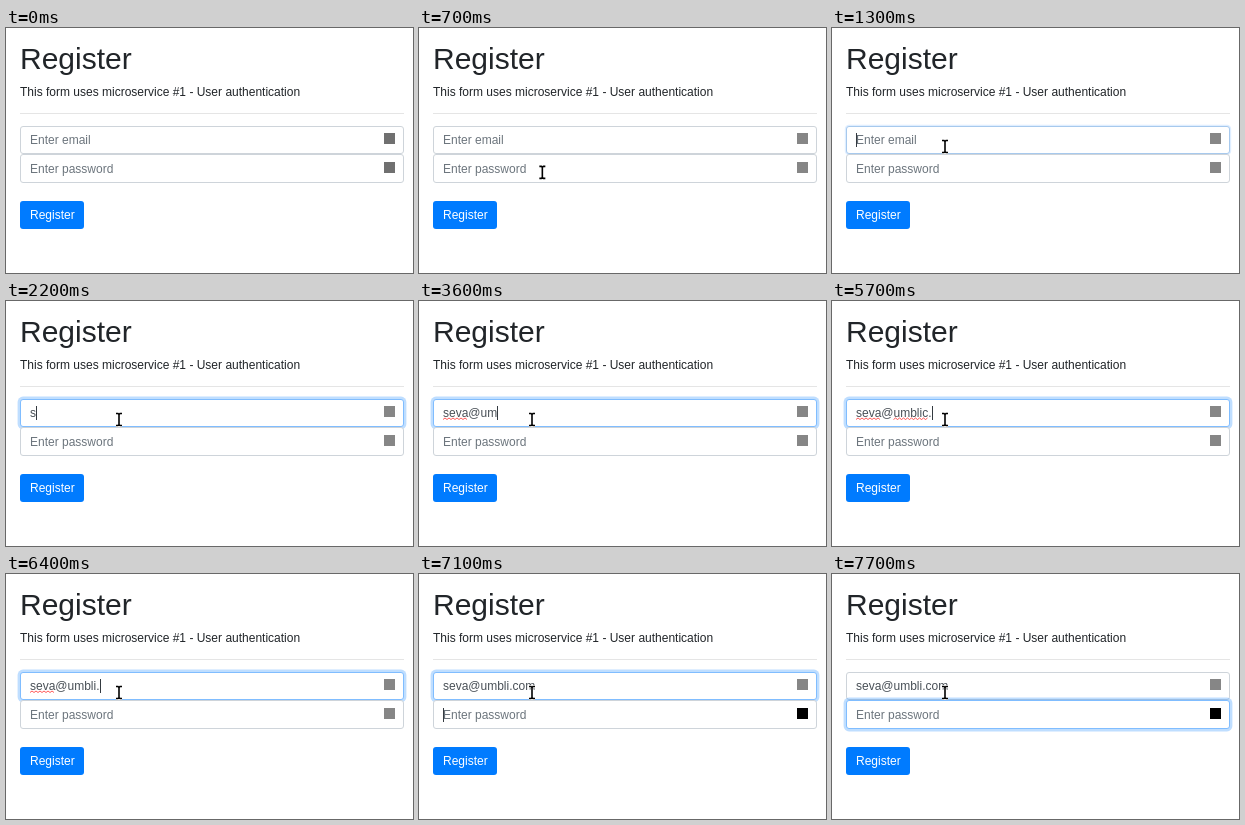
An HTML page for the animation above (8 s loop, 407 by 245 pixels).

```html
<!DOCTYPE html>
<html lang="en">
<head>
<meta charset="utf-8">
<title>Register</title>
<style>
  html, body { margin: 0; width: 100%; height: 100%; overflow: hidden; background: #fff; }
  body { position: relative; color: #212529; font: 12px/18px "Liberation Sans", Arial, sans-serif; }
  body > * { position: absolute; box-sizing: border-box; margin: 0; white-space: pre; }
  h1 { left: 14px; top: 13px; font-size: 30px; line-height: 35px; font-weight: 400; }
  p { left: 14px; top: 55px; }
  hr { left: 14px; top: 85px; width: 384px; height: 1px; border: 0; background: rgba(0, 0, 0, .1); }
  .field { left: 14px; width: 384px; border: 1px solid #ced4da; border-radius: 3px; background: #fff; }
  #email { top: 98px; height: 28px; }
  #pass { top: 126px; height: 29px; }
  .text { left: 24px; color: #6c757d; }
  #emailText { top: 103px; }
  #passText { top: 132px; }
  .icon { left: 378px; width: 11px; height: 11px; }
  #icon1 { top: 105px; }
  #icon2 { top: 134px; }
  #button { left: 14px; top: 173px; width: 64px; height: 28px; border-radius: 3px; background: #007bff; }
  #label { left: 24px; top: 178px; color: #fff; }
  #caret { width: 1px; height: 14px; background: #343a40; }
  svg { left: 0; top: 0; }
</style>
</head>
<body>
<h1>Register</h1>
<p>This form uses microservice #1 - User authentication</p>
<hr>
<div class="field" id="email"></div>
<div class="field" id="pass"></div>
<span class="text" id="emailText">Enter email</span>
<span class="text" id="passText">Enter password</span>
<i class="icon" id="icon1"></i>
<i class="icon" id="icon2"></i>
<div id="button"></div>
<span id="label">Register</span>
<i id="caret"></i>
<svg width="407" height="245" fill="none">
  <g stroke="#f00" stroke-opacity=".65" stroke-width="1">
    <path id="wave1"/>
    <path id="wave2"/>
  </g>
  <g id="mouse">
    <g id="beam">
      <path d="M-3-5.5H-1L0-4.5 1-5.5H3M0-4.5V5.5M-3 6.5H-1L0 5.5 1 6.5H3" stroke="#fff" stroke-width="3.2"/>
      <path d="M-3-5.5H-1L0-4.5 1-5.5H3M0-4.5V5.5M-3 6.5H-1L0 5.5 1 6.5H3" stroke="#000" stroke-width="1.6"/>
    </g>
    <path id="arrow" d="M0 0V14L3.2 11 5.4 16 7.8 15 5.6 10.2H10Z" fill="#000" stroke="#fff"/>
  </g>
</svg>
<script>
const LOOP = 8000, LEFT = 24;
const $ = id => document.getElementById(id);
const pen = document.createElement('canvas').getContext('2d');
pen.font = '12px "Liberation Sans", Arial, sans-serif';
const widthOf = s => pen.measureText(s).width;

const user = 'seva', host = 'umbli';
const address = user + '@' + host;

// [time, characters of the address, typed suffix]
const keys = [
  [2200, 1], [2500, 3], [2600, 4], [3000, 5], [3400, 6], [3600, 7], [3800, 8], [4000, 10],
  [4300, 10, 'c'], [4400, 10, 'c.'], [4700, 10, 'c.o'],
  [5200, 10, 'c.'], [5300, 10, 'c'], [5400, 10], [5700, 10, 'c.'],
  [6100, 10, 'c'], [6200, 10], [6400, 10, '.'],
  [6600, 10, '.c'], [6800, 10, '.co'], [6900, 10, '.com']
];

const within = (t, a, b) => t >= a && t < b;
const show = (el, on) => { el.style.visibility = on ? 'visible' : 'hidden'; };
const mix = (a, b, p) => a + (b - a) * p;

function valueAt(t) {
  let text = '';
  for (const [at, count, tail = ''] of keys) {
    if (t >= at) text = address.slice(0, count) + tail;
  }
  return text;
}

function setFocus(el, p) {
  const rgb = [mix(206, 128, p), mix(212, 189, p), mix(218, 255, p)].map(Math.round);
  el.style.borderColor = `rgb(${rgb})`;
  el.style.boxShadow = p ? `0 0 0 ${2.4 * p}px rgba(0, 123, 255, ${.25 * p})` : 'none';
}

function setWave(el, x, width, on) {
  show(el, on);
  if (!on) return;
  let d = `M${x} 118.5`;
  for (let i = 2; i <= width; i += 2) d += `L${x + i} ${i % 4 ? 117 : 118.5}`;
  el.setAttribute('d', d);
}

function setMouse(t) {
  show($('mouse'), t >= 400);
  const rest = Math.pow(1 - Math.min(1, Math.max(0, (t - 300) / 600)), 1.6);
  const x = 113 + 60 * rest, y = 118 + 150 * rest;
  $('mouse').setAttribute('transform', `translate(${x} ${y})`);
  const inField = y < 155;
  $('beam').style.display = inField ? '' : 'none';
  $('arrow').style.display = inField ? 'none' : '';
}

function draw(now) {
  // The screen is refreshed ten times a second.
  const t = Math.floor((now % LOOP) / 100) * 100;
  const text = valueAt(t);

  $('emailText').textContent = text || 'Enter email';
  $('emailText').style.color = text ? '#495057' : '#6c757d';

  setFocus($('email'), t < 1300 ? 0 : t < 1400 ? .5 : t < 7200 ? 1 : t < 7300 ? .45 : 0);
  setFocus($('pass'), t < 7200 ? 0 : t < 7300 ? .6 : 1);
  $('icon1').style.background = t < 500 ? '#707070' : '#868686';
  $('icon2').style.background = t >= 7100 ? '#000' : t < 500 ? '#707070' : '#868686';

  const onPass = t >= 7100;
  show($('caret'), within(t, 1300, 1900) || within(t, 2200, 7700));
  $('caret').style.left = Math.round(LEFT + (onPass ? 0 : widthOf(text))) + 'px';
  $('caret').style.top = (onPass ? 134 : 105) + 'px';

  const word = text.slice(user.length + 1).split('.')[0];
  setWave($('wave1'), LEFT, widthOf(user), within(t, 3000, 7100));
  setWave($('wave2'), LEFT + widthOf(user + '@'), widthOf(word),
    within(t, 4400, 5400) || within(t, 5700, 6300));

  setMouse(t);
}

const start = performance.now();
function tick() {
  draw(performance.now() - start);
  requestAnimationFrame(tick);
}
tick();
</script>
</body>
</html>
```
